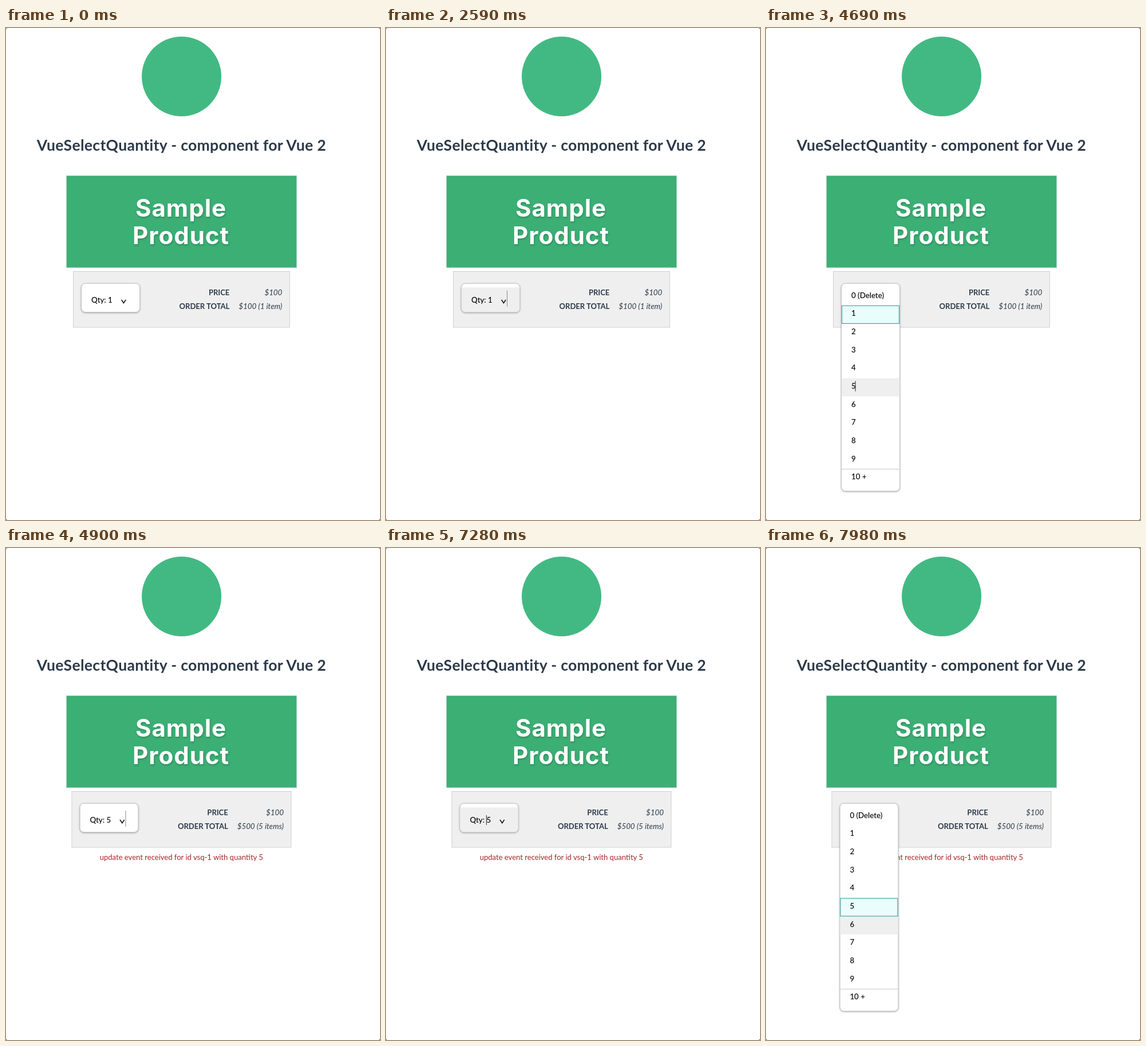
An HTML page that plays this animation: 653 by 858 pixels, repeating every 8000 ms.

```html
<!DOCTYPE html>
<html lang="en">
<head>
<meta charset="utf-8">
<title>VueSelectQuantity</title>
<style>
  html, body { margin: 0; width: 100%; height: 100%; overflow: hidden; background: #fff; }
  svg { display: block; width: 653px; height: 858px; font: 500 13.3px Lato, "Open Sans", sans-serif; }
  .title { font-size: 26.5px; font-weight: 700; letter-spacing: .33px; fill: #2c3a49; }
  .banner { font: 700 42px Inter, "Open Sans", sans-serif; letter-spacing: 1px; fill: #fff; filter: drop-shadow(1px 2px 1.5px #0003); }
  .label { font-size: 13px; font-weight: 700; fill: #2c3a49; }
  .value { font-style: italic; font-weight: 400; fill: #2c3a49; }
  .note { font-size: 13.05px; font-weight: 400; fill: #a2262a; }
  .panel { fill: #fff; stroke: #c6c6c6; filter: drop-shadow(0 1px 1.5px #0005); }
</style>
</head>
<body>
<svg id="stage" viewBox="0 0 653 858">
  <path d="M0 0h3Q0 0 0 3zM653 0v3Q653 0 650 0zM0 858v-3Q0 858 3 858zM653 858h-3Q653 858 653 855z" fill="#444"/>
  <circle cx="306.5" cy="84.5" r="69.5" fill="#42b983"/>
  <text class="title" x="306.3" y="213.5" text-anchor="middle">VueSelectQuantity - component for Vue 2</text>
  <rect x="105.5" y="257.5" width="402" height="160.5" fill="#3baf74" stroke="#b9d6c6"/>
  <g class="banner" text-anchor="middle">
    <text x="305.5" y="328.5">Sample</text>
    <text x="305.5" y="377">Product</text>
  </g>
  <rect id="card" y="424.5" height="97.5" fill="#efefef" stroke="#d0d0d0"/>
  <g id="labels" class="label" text-anchor="end">
    <text x="390.3" y="465.5">PRICE</text>
    <text x="390.3" y="489.5">ORDER TOTAL</text>
  </g>
  <g id="values" class="value" text-anchor="end">
    <text x="482.3" y="465.5">$100</text>
    <text id="total" x="482.3" y="489.5"></text>
  </g>
  <text id="note" class="note" x="306.3" y="544" text-anchor="middle">update event received for id vsq-1 with quantity 5</text>
  <clipPath id="inside"><rect id="clip" x="132" y="445.8" width="101.2" rx="6.5"/></clipPath>
  <g id="select">
    <rect id="panel" class="panel" x="131.7" y="445.5" width="101.8" rx="7"/>
    <g clip-path="url(#inside)"><rect id="hover" x="131" width="103" fill="#efefef"/></g>
    <g id="closed">
      <text id="qty" x="149" y="478.5"></text>
      <path d="M201.6 473.8l3.8 5.8 3.8-5.8" fill="none" stroke="#000" stroke-width="1.5"/>
    </g>
    <g id="list">
      <rect id="chosen" x="132.5" width="100" height="31" fill="#eafdfd" stroke="#4ba3a3" stroke-width="1.2"/>
      <path d="M132 769.3h101" stroke="#c8c8c8"/>
    </g>
    <rect id="caret" width="1"/>
  </g>
</svg>
<script>
const $ = id => document.getElementById(id);
const set = (id, attrs) => { for (const k in attrs) $(id).setAttribute(k, attrs[k]); };
const show = (id, on) => set(id, { visibility: on ? "visible" : "hidden" });
const LOOP = 8000, ROW = 31.66, TOP = 452.4;
const rowY = i => TOP + i * ROW;

for (let i = 0; i <= 10; i++) {
  const t = document.createElementNS("http://www.w3.org/2000/svg", "text");
  t.textContent = i === 0 ? "0 (Delete)" : i === 10 ? "10 +" : i;
  t.setAttribute("x", 149);
  t.setAttribute("y", rowY(i) + 18.3);
  $("list").append(t);
}

// caret places: x, y, height, colour
const carets = {
  box: [211, 458, 28, "#888"],
  last: [175.2, 774, 18, "#222"],
  five: [155.6, 615.5, 18, "#222"],
  digit: [177.5, 466, 17, "#222"]
};

// [time, changes]; hover is a row number or null
const steps = [
  [0, { open: false, qty: 1, hover: null, caret: null }],
  [2590, { hover: 0, caret: "box" }],
  [2730, { open: true, caret: "last" }],
  [3150, { caret: null }],
  [3570, { hover: null }],
  [3640, { hover: 2, caret: "last" }],
  [3780, { hover: 3 }],
  [3920, { hover: 4 }],
  [4130, { caret: null }],
  [4340, { hover: 5 }],
  [4690, { caret: "five" }],
  [4900, { open: false, qty: 5, hover: null, caret: "box" }],
  [5250, { caret: null }],
  [5740, { caret: "box" }],
  [5950, { hover: 0 }],
  [6300, { caret: null }],
  [6790, { caret: "box" }],
  [7280, { caret: "digit" }],
  [7490, { open: true, caret: "last" }],
  [7630, { hover: 1 }],
  [7700, { hover: 2 }],
  [7770, { hover: 3 }],
  [7840, { hover: 4 }],
  [7910, { hover: null, caret: null }],
  [7980, { hover: 6 }]
];

function draw({ open, qty, hover, caret }) {
  const many = qty > 1, dx = many ? 2.6 : 0;
  set("card", { x: 117.5 - dx, width: 377.8 + 2 * dx });
  set("labels", { transform: `translate(${-dx})` });
  set("values", { transform: `translate(${dx})` });
  set("select", { transform: `translate(${-dx})` });
  $("total").textContent = `$${qty * 100} (${qty} item${many ? "s" : ""})`;
  $("qty").textContent = `Qty: ${qty}`;
  show("note", many);
  show("closed", !open);
  show("list", open);
  set("panel", { height: open ? 362 : 50 });
  set("clip", { height: open ? 361.4 : 49.4 });
  set("chosen", { y: rowY(qty) + .3 });
  show("hover", hover !== null);
  set("hover", { y: rowY(hover || 0), height: open ? ROW : 44 });
  show("caret", caret);
  if (caret) {
    const [x, y, height, fill] = carets[caret];
    set("caret", { x, y, height, fill });
  }
}

let last = -1;
function frame(now) {
  const t = now % LOOP;
  const n = steps.filter(s => s[0] <= t).length;
  if (n !== last) {
    draw(Object.assign({}, ...steps.slice(0, n).map(s => s[1])));
    last = n;
  }
  requestAnimationFrame(frame);
}
frame(0);
</script>
</body>
</html>
```
